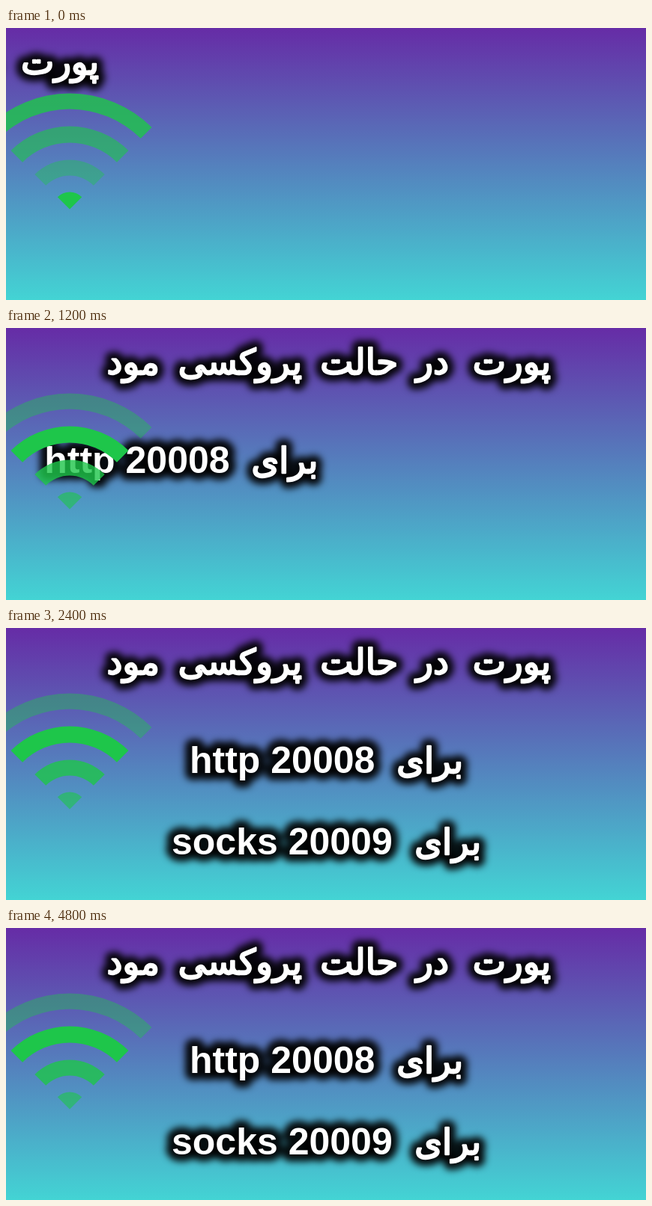
An HTML page with a canvas that plays this animation: 854 px wide and 364 px high, repeating every 5.1 s.

```html
<!DOCTYPE html>
<html lang="fa">
<head>
<meta charset="utf-8">
<style>
html, body { margin: 0; width: 100%; height: 100%; overflow: hidden; }
canvas { display: block; }
</style>
</head>
<body>
<canvas id="stage" width="854" height="364"></canvas>
<script>
const ctx = document.getElementById('stage').getContext('2d');
const LOOP = 5100, STEP = 100;
const PERSIAN = '47px "DejaVu Sans", sans-serif';
const LATIN = 'bold 50px "Liberation Sans", Arial, sans-serif';

// Each line slides right at a steady speed (px per ms) until its right edge meets `end`.
// Words hold their offset from that right edge.
const lines = [
  { end: 727, arrive: 880, speed: .685, y: 62, rise: 0,
    words: [['پورت', 0], ['در', -136], ['حالت', -204], ['پروکسی', -332], ['مود', -522]] },
  { end: 610, arrive: 1450, speed: .775, y: 194, rise: 0,
    words: [['برای', 0], ['http 20008', -365, true]] },
  { end: 634, arrive: 2350, speed: .648, y: 303, rise: .026,
    words: [['برای', 0], ['socks 20009', -413, true]] }
];

function eachWord(line, t, draw) {
  const left = Math.max(0, line.arrive - t);
  const x = line.end - left * line.speed;
  const y = line.y - left * line.rise;
  for (const [text, dx, latin] of line.words) {
    ctx.font = latin ? LATIN : PERSIAN;
    ctx.direction = latin ? 'ltr' : 'rtl';
    ctx.textAlign = latin ? 'left' : 'right';
    draw(text, x + dx, y, latin);
  }
}

function drawLine(line, t) {
  if (line.end - (line.arrive - t) * line.speed < -16) return;
  ctx.save();
  ctx.lineJoin = 'round';
  ctx.filter = 'blur(5px)';
  ctx.lineWidth = 19;
  ctx.strokeStyle = 'rgba(0, 0, 0, .94)';
  eachWord(line, t, (s, x, y) => ctx.strokeText(s, x, y));
  ctx.filter = 'none';
  ctx.lineWidth = 2.4;
  ctx.fillStyle = ctx.strokeStyle = '#fff';
  eachWord(line, t, (s, x, y, latin) => {
    ctx.fillText(s, x, y);
    if (!latin) ctx.strokeText(s, x, y); // thickens the regular weight
  });
  ctx.restore();
}

// Signal icon: bands from the dot outwards, as [outer radius, inner radius].
const bands = [[23, 0], [66, 45], [111, 89], [155, 134]];
const pulses = [0, 700, 1700, 2550, 3400, 4200];

// The bright band moves outwards from the dot, then rests on the third band.
function pulseAt(t) {
  const age = t - pulses.filter(p => p <= t).pop();
  return age < 125 ? age / 125 : Math.min(2, 1 + (age - 125) / 325);
}

const level = (band, peak) => 1 - .2 * ((peak - band + 4) % 4);

function drawIcon(t) {
  const pos = pulseAt(t), peak = Math.floor(pos), mix = pos - peak;
  ctx.fillStyle = '#1ec64a';
  bands.forEach(([outer, inner], i) => {
    ctx.globalAlpha = level(i, peak) * (1 - mix) + level(i, peak + 1) * mix;
    ctx.beginPath();
    ctx.arc(85, 242.6, outer, -Math.PI * .75, -Math.PI * .25);
    ctx.arc(85, 242.6, inner, -Math.PI * .25, -Math.PI * .75, true);
    ctx.fill();
  });
  ctx.globalAlpha = 1;
}

const sky = ctx.createLinearGradient(0, 0, 0, 364);
sky.addColorStop(0, '#662ca6');
sky.addColorStop(1, '#43d4d4');

function frame(now) {
  const t = Math.floor(now % LOOP / STEP) * STEP;
  ctx.fillStyle = sky;
  ctx.fillRect(0, 0, 854, 364);
  lines.forEach(line => drawLine(line, t));
  drawIcon(t);
  requestAnimationFrame(frame);
}
frame(0);
</script>
</body>
</html>
```
